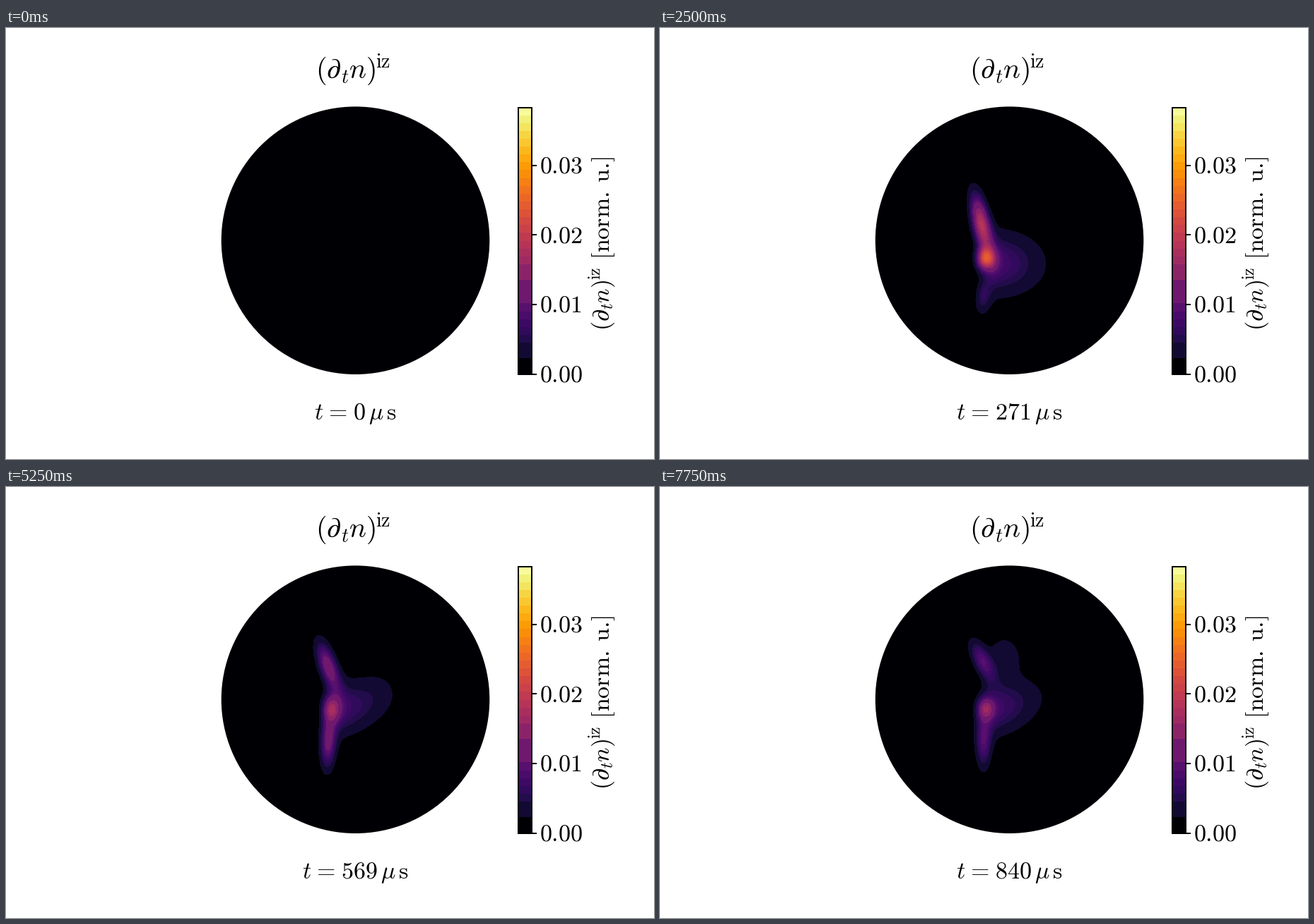
Recreate the animation shown at these times as a matplotlib script. Size 917x611 px, loop 8000 ms.

```python
import numpy as np
import matplotlib.pyplot as plt
from matplotlib.animation import FuncAnimation
from matplotlib.patches import Circle, Rectangle

W, H, DPI = 917, 611, 100
FRAMES, INTERVAL = 32, 250
US_PER_FRAME = 27.11
PX = 72 / DPI  # points per pixel

plt.rcParams["mathtext.fontset"] = "cm"

# Values are counted in colour steps: 34 steps fill the colour bar.
STEPS = 34
LEVELS = np.array([0, 2, *range(4, 10), 12, *range(14, STEPS + 1)])
COLORS = [plt.cm.inferno(m / STEPS) for m in (LEVELS[:-1] + LEVELS[1:]) / 2]
COLORS[0] = "#000004"

GX, GY = np.meshgrid(np.arange(420, 580, 0.8), np.arange(180, 430, 0.8))


def blob(x, y, height, left, right, tall, lean=0, tilt=0):
    """Gaussian hill with its own width on either side.

    lean shears it along x, tilt along y.
    """
    dx = GX - x - lean * (GY - y)
    dy = GY - y - tilt * (GX - x)
    wide = np.where(dx < 0, left, right)
    return height * np.exp(-((dx / wide)**2 + (dy / tall)**2) / 2)


def field(frame):
    age = max(frame - 4, 0)
    left = FRAMES - 1 - frame
    settle = 1 - np.exp(-(age / 5)**2)       # first spreading
    sway = np.exp(-((frame - 10) / 2.2)**2)  # brief downward swing
    gain = 1 + 0.1 * np.exp((1 - frame) / 2)

    arm = 7 + 2 * settle
    upper = blob(451 + 5 * settle, 268 - 0.8 * age + 15 * sway,
                 20 * np.exp(-age / 27), arm, arm, 31 - 0.42 * age,
                 lean=0.13 + 0.01 * age)
    lower = blob(453 + 0.17 * age + 3 * sway, 345 + 17 * settle + 24 * sway,
                 15 * np.exp(-age / 36) * (1 - 0.65 * sway), 7.5, 7.5,
                 30 - 4 * settle - 10 * sway, lean=0.004 * age - 0.1)
    core = blob(457 + 3 * settle, 314 + 13 * sway,
                8.5 + 9 * np.exp(-(age / 10)**2), 8, 13 - 4 * settle,
                16 - 0.2 * age - 4 * sway)
    fan = blob(470 + 4 * sway, 307 + 9 * settle + 20 * sway,
               8 - 1.7 * settle, 8 + 5 * settle, 46,
               8 + 19 * settle + 9 * sway,
               tilt=0.17 - 0.4 * settle + 0.14 * sway)
    lobe = blob(487 + 4.3 * left, 240 + 4.5 * left,
                3.3 * np.exp(-(left / 8)**2), 18, 18, 22)
    return gain * (upper + lower + core + fan + lobe)


fig = plt.figure(figsize=(W / DPI, H / DPI), dpi=DPI, facecolor="white")
ax = fig.add_axes([0, 0, 1, 1])
ax.axis("off")


def fit_stage():
    ax.set_xlim(0, W)
    ax.set_ylim(H, 0)


def label(x, y, text, size=34, **kw):
    kw = {"ha": "center", "va": "baseline", **kw}
    return ax.text(x, y, text, fontsize=size * PX, color="black", **kw)


RATE = (r"(\partial_t\hspace{-0.05} n)"
        r"^{\hspace{-0.13}\mathrm{iz}}")
label(491.5, 71, f"${RATE}$", 40)
label(853.5, 305, rf"${RATE}\ [\mathrm{{norm.\:u.\!}}]$",
      rotation=90, rotation_mode="anchor")
clock = label(494.5, 555, "")

ax.add_patch(Circle((494.5, 301.2), 189.8, fc=COLORS[0], ec="none"))

# Colour bar
X0, X1, TOP, BOTTOM = 724.5, 743.5, 112.5, 490.5
STEP = (BOTTOM - TOP) / STEPS
for lo, hi, color in zip(LEVELS[:-1], LEVELS[1:], COLORS):
    ax.add_patch(Rectangle((X0, BOTTOM - hi * STEP), X1 - X0,
                           (hi - lo) * STEP, fc=color, ec="none",
                           antialiased=False))
ax.add_patch(Rectangle((X0, TOP), X1 - X0, BOTTOM - TOP,
                       fill=False, ec="black", lw=2 * PX))
for i in range(4):
    y = BOTTOM - 98.6 * i
    ax.plot([X1, 750.5], [y, y], color="black", lw=2 * PX,
            solid_capstyle="butt")
    label(755, y + 11, f"$0.0{i}$", ha="left")

fit_stage()
contours = []


def draw(frame):
    while contours:
        contours.pop().remove()
    time = round(US_PER_FRAME * frame)
    clock.set_text(rf"$t\hspace{{0.08}}=\hspace{{0.08}}{time}"
                   r"\,\mu\,\mathrm{s}$")
    if frame:
        contours.append(ax.contourf(GX, GY, field(frame), levels=LEVELS[1:],
                                    colors=COLORS[1:], zorder=2))
        fit_stage()
    return [clock]


anim = FuncAnimation(fig, draw, frames=FRAMES, interval=INTERVAL,
                     init_func=lambda: draw(0), repeat=True, repeat_delay=0)
plt.show()
```
